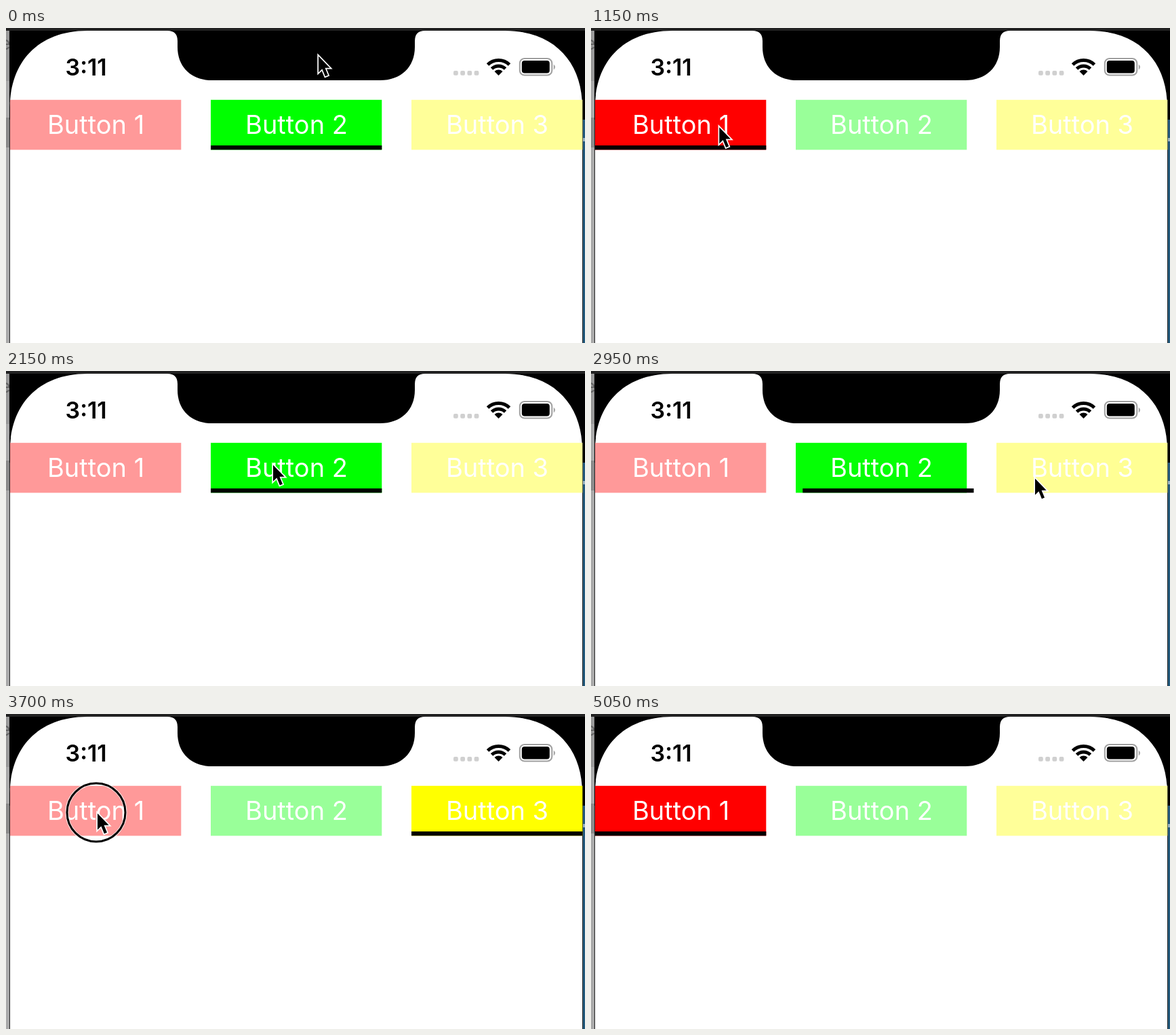
Animation, 854 px wide and 464 px high, one loop 5480 ms. Source, as an HTML page:

```html
<!DOCTYPE html>
<html lang="en">
<head>
<meta charset="utf-8">
<title>Tab buttons</title>
<style>
  html, body { margin: 0; width: 100%; height: 100%; overflow: hidden; background: #fff; }
  svg { display: block; width: 854px; height: 464px; }
  text { font-family: Inter, Roboto, "Liberation Sans", sans-serif; }
  .label { font-size: 38px; fill: #fff; text-anchor: middle; }
</style>
</head>
<body>
<svg viewBox="0 0 854 464">
  <!-- desktop behind the phone -->
  <rect width="854" height="464" fill="#aaa"/>
  <rect y="4" width="6" height="74" fill="#999"/>
  <rect y="132" width="6" height="44" fill="#8b8b8b"/>
  <text x="-9" y="32" font-size="27" fill="#666">e</text>
  <rect x="850" y="134" width="4" height="330" fill="#245a7c"/>
  <rect x="851" y="162" width="3" height="5" fill="#9ab4c4"/>
  <rect x="5" width="849" height="135" fill="#000"/>
  <rect x="5" y="135" width="846" height="329" fill="#222"/>
  <rect width="854" height="4" fill="#222"/>
  <!-- screen with notch -->
  <path fill="#fff" d="M6 464V116C6 52 46 4 120 4H238Q253 4 253 19V28C253 58 274 77 304 77H552C582 77 603 58 603 28V19Q603 4 618 4H736C810 4 850 52 850 116V464Z"/>
  <!-- status bar -->
  <text x="87.500" y="70" font-size="34" font-weight="600">3:11</text>
  <g id="dots" fill="#d0d0d0"></g>
  <g fill="none" stroke="#000" stroke-width="5">
    <path d="M710.500 54A23 23 0 0 1 742.500 54M716.500 60A14.500 14.500 0 0 1 736.500 60"/>
  </g>
  <path d="M726.500 70L720.500 64A8.500 8.500 0 0 1 732.500 64Z"/>
  <rect x="757.800" y="45" width="47.500" height="24.500" rx="7" fill="none" stroke="#a0a0a0" stroke-width="2"/>
  <rect x="760.800" y="48" width="41" height="18.500" rx="4"/>
  <path d="M807.800 53.500Q812 57.500 807.800 61.500Z" fill="#a0a0a0"/>
  <!-- tabs -->
  <g id="tabs"></g>
  <rect id="line" y="173" width="252.300" height="6.300"/>
  <!-- pointer -->
  <g id="ring" fill="none">
    <circle r="43" stroke="#fff" stroke-width="5" stroke-opacity=".7"/>
    <circle r="43" stroke="#000" stroke-width="3"/>
  </g>
  <path id="cursor" d="M2 3.500V27.500L7.400 22.300L11.900 33.200L16 31.500L11.500 20.800H18.700Z" stroke="#fff" stroke-width="3.400" paint-order="stroke"/>
</svg>
<script>
const LOOP = 5480, STEP = 50, SLIDE = 350;
const $ = id => document.getElementById(id);
const tabX = i => 6 + 296 * i;

// Tab changes: start time, from, to
const slides = [[695, 1, 0], [1710, 0, 1], [2911, 1, 2], [3871, 2, 0]];
// Pointer moves: start, end, x, y
const moves = [[0, 0, 459, 38], [0, 400, 180, 143], [1100, 1550, 392, 135],
               [2200, 2700, 653, 155], [3300, 3450, 133, 143]];
const presses = [[550, 690], [1650, 1710], [2800, 2910], [3700, 3870]];
const POINTER_GONE = 4400;

const paint = [v => `rgb(255,${v},${v})`, v => `rgb(${v},255,${v})`, v => `rgb(255,255,${v})`];

$('dots').innerHTML = [0, 1, 2, 3].map(i =>
  `<rect x="${660 + 10.2 * i}" y="63" width="6.800" height="6.800" rx="2"/>`).join('');
$('tabs').innerHTML = paint.map((_, i) =>
  `<rect x="${tabX(i)}" y="105.800" width="252.300" height="73.600"/>
   <text class="label" x="${tabX(i) + 126.500}" y="156">Button ${i + 1}</text>`).join('');
const tabs = $('tabs').querySelectorAll('rect');

function ease(t, start, end) {
  if (t >= end) return 1;
  const u = Math.max(0, (t - start) / (end - start));
  return u * u * (3 - 2 * u);
}

function draw(t) {
  let x = tabX(1), glow = [0, 1, 0];
  for (const [start, from, to] of slides) {
    if (t < start) break;
    const p = ease(t, start, start + SLIDE);
    x = tabX(from) + (tabX(to) - tabX(from)) * p;
    glow = [0, 0, 0];
    glow[from] = 1 - p;
    glow[to] = p;
  }
  $('line').setAttribute('x', x);
  tabs.forEach((tab, i) => tab.setAttribute('fill', paint[i](Math.round(153 * (1 - glow[i])))));

  let [, , px, py] = moves[0];
  for (const [start, end, mx, my] of moves) {
    const p = ease(t, start, end);
    px += (mx - px) * p;
    py += (my - py) * p;
  }
  $('cursor').setAttribute('transform', `translate(${px} ${py})`);
  $('cursor').setAttribute('opacity', t < POINTER_GONE ? 1 : 0);
  $('ring').setAttribute('transform', `translate(${px} ${py + 2})`);
  $('ring').setAttribute('opacity', presses.some(([a, b]) => t >= a && t < b) ? 1 : 0);
}

const origin = performance.now();
function tick() {
  const t = (performance.now() - origin) % LOOP;
  draw(Math.floor(t / STEP) * STEP);
  requestAnimationFrame(tick);
}
tick();
</script>
</body>
</html>
```
